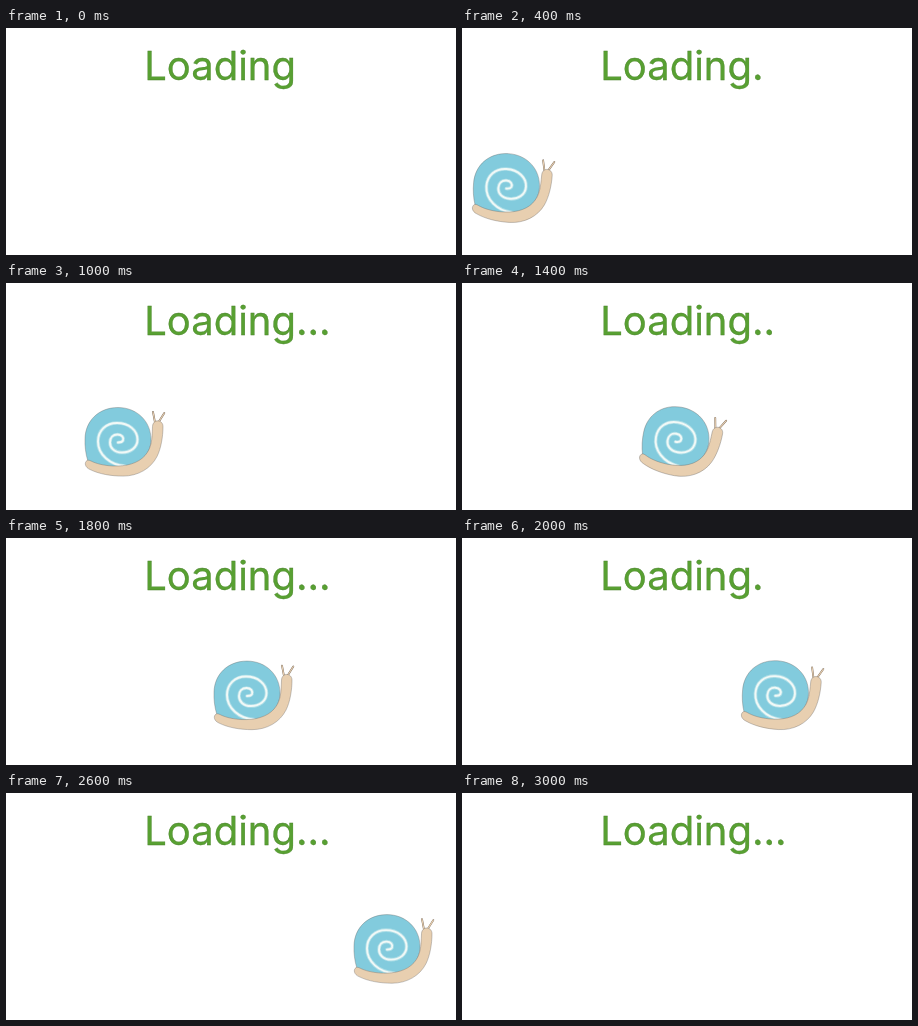
An HTML page for the animation above (3.2 s loop, 450x227 px).

```html
<!DOCTYPE html>
<html lang="en">
<head>
<meta charset="utf-8">
<title>Loading</title>
<style>
  html, body { margin: 0; width: 100%; height: 100%; overflow: hidden; background: #fff; }
  svg { display: block; width: 450px; height: 227px; }
  text { font: 400 40px Inter, Roboto, sans-serif; fill: #58a032; stroke: #447c27; stroke-width: .3; }
  .skin { fill: #e8cfb0; }
  .edge { stroke: #6d6a66; stroke-width: .5; stroke-opacity: .75; }
  .line { fill: none; stroke-linecap: round; stroke-linejoin: round; }
</style>
</head>
<body>
<svg viewBox="0 0 450 227">
  <text id="label" x="138.2" y="52">Loading</text>
  <!-- The snail is drawn around its shell centre -->
  <g id="snail">
    <path class="edge" fill="#82cbdd" d="M0-32C19-32 33-18 33 0C33 16 20 28 0 28C-16 28-27 27-30 22C-32.5 14-33.3 6-33-1C-32.5-19-19-32 0-32Z"/>
    <g class="line">
      <path id="glow" stroke="#c4e7ec" stroke-width="3.6" stroke-opacity=".65"/>
      <path id="spiral" stroke="#f1f9f7" stroke-width="1.9"/>
      <path stroke="#77695c" stroke-width="1.8" d="M37-17L35-27.5M41-18L46.3-26.5"/>
      <path stroke="#e8cfb0" stroke-width="1.1" d="M37-17L35-27.5M41-18L46.3-26.5"/>
    </g>
    <path class="skin edge" d="M-31 21C-34 23-33 28-28 30C-19 34.5-7 36.6 5 36.6C20 36.6 33 29 39 17C43 9 45-3 45-13C45-20 35-21 34.5-13C34 0 34 8 27 16C20 24 8 27-5 26.5C-15 26-22 24-27 21.5C-29 20.5-30 20.5-31 21Z"/>
  </g>
</svg>
<script>
const LOOP = 3200, STEP = 200, STRIDE = 4;
const label = document.getElementById("label");
const snail = document.getElementById("snail");

const spiral = "M7 26.5C-8 25.5-20 15-20 2C-20-9-12-16.5-1-16.5C11-16.5 19.5-9 19.5 0" +
  "C19.5 8 12.5 13 4 13C-4 13-8 8-8 3C-8-2-5-5-.5-5C4-5 6-2 5 1C4 3 2 3 0 3";
for (const id of ["glow", "spiral"]) document.getElementById(id).setAttribute("d", spiral);

// Each stride: lunge forward, glide on a tilt, then rear up
const strideStart = [44.5, 173.5, 313.5, 456];
const advance = [0, 40.5, 59, 67.5];
const tilt = [3.5, 10, 11.5, 0];
const dotCount = [1, 2, 3, 3];

function draw(time) {
  const step = Math.floor((time % LOOP) / STEP);
  const stride = Math.floor((step - 2) / STRIDE);
  const phase = (step + 2) % STRIDE;
  const dots = step < 2 ? 0 : step > 13 ? 3 : dotCount[phase];
  label.textContent = "Loading" + ".".repeat(dots);

  const visible = step > 0 && step < 15;
  snail.style.display = visible ? "" : "none";
  if (!visible) return;
  const x = step === 1 ? 3 : strideStart[stride] + advance[phase];
  const y = 158.3 - 0.36 * step;
  snail.setAttribute("transform", `translate(${x} ${y}) rotate(${tilt[phase]})`);
}

const start = performance.now();
function tick() {
  draw(performance.now() - start);
  requestAnimationFrame(tick);
}
tick();
</script>
</body>
</html>
```
